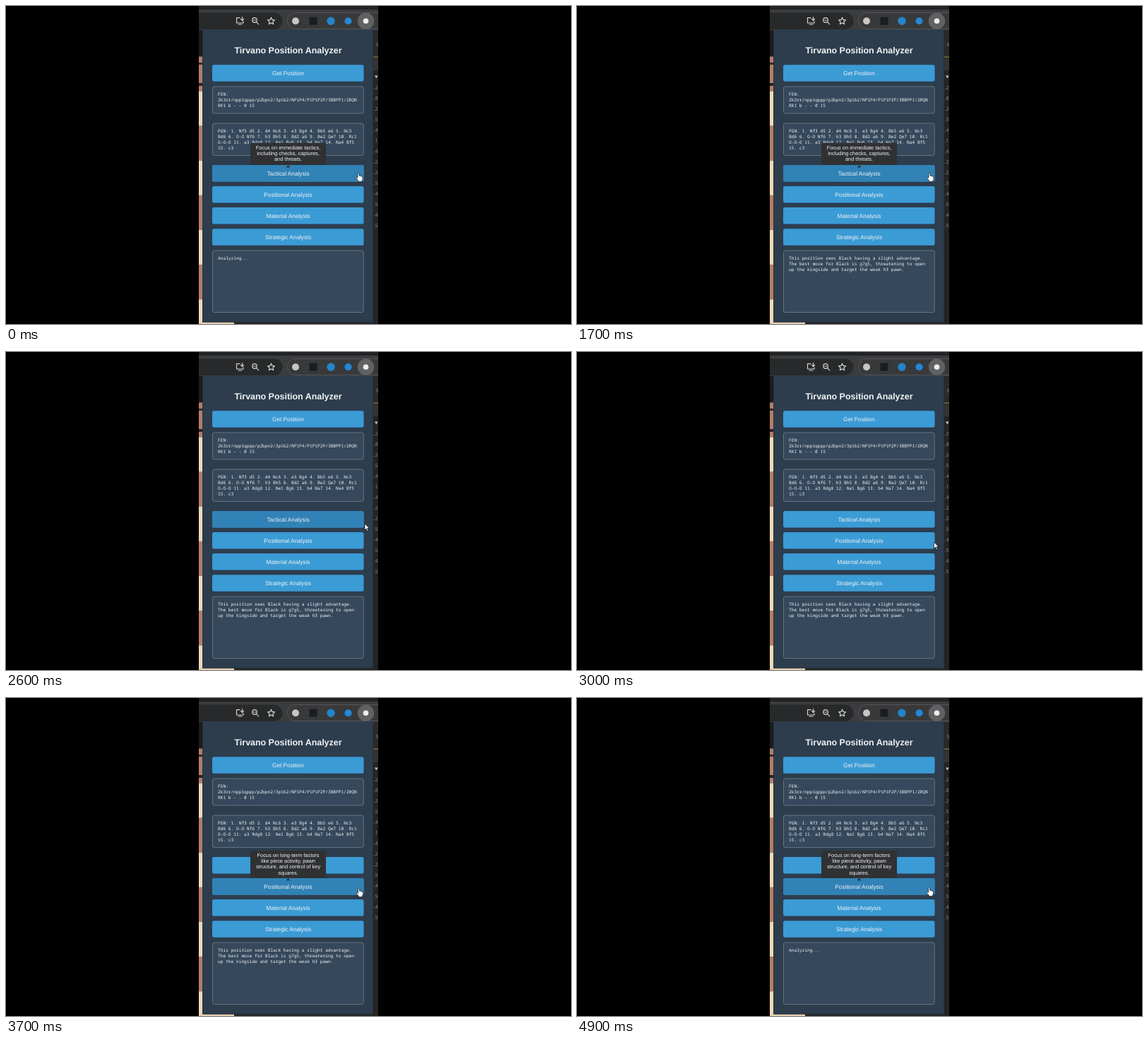
Recreate the animation shown at these times as an HTML page. Size 800 by 450 pixels, loop 5000 ms.

```html
<!DOCTYPE html>
<html lang="en">
<head>
<meta charset="utf-8">
<title>Position Analyzer</title>
<style>
  html, body { margin: 0; width: 100%; height: 100%; overflow: hidden; background: #000; }
  svg { display: block; width: 100vw; height: 100vh; }
  text { fill: #f1f3f5; text-rendering: geometricPrecision; white-space: pre; }
  .ui { font-family: "Liberation Sans", Arial, sans-serif; text-anchor: middle; }
  .title { font-size: 12.45px; font-weight: bold; }
  .label { font-size: 8.25px; }
  .tip { font-size: 7.4px; }
  .mono { font: 6.2px "Noto Sans Mono", "DejaVu Sans Mono", monospace; }
  .side { font: 7px "Noto Sans", sans-serif; fill: #85857f; }
  .icon { fill: none; stroke: #d4d4d4; stroke-width: 1.2; stroke-linecap: round; stroke-linejoin: round; }
  .cursor { fill: #fff; stroke: #111; stroke-width: .7; stroke-linejoin: round; }
</style>
</head>
<body>
<svg id="stage" viewBox="0 0 800 450" preserveAspectRatio="none">
  <defs><clipPath id="phone"><rect x="273" width="254" height="450"/></clipPath></defs>
  <rect width="800" height="450"/>
  <g clip-path="url(#phone)">
    <rect x="273" width="254" height="450" fill="#242424"/>
    <g id="board"></g>
    <g id="side"></g>
    <g id="bar">
      <rect x="273" width="254" height="34" fill="#3b3c3d"/>
      <rect x="273" width="254" height="5" fill="#212223"/>
      <rect x="250" y="9.5" width="141.500" height="23.500" rx="11.700" fill="#28292a"/>
      <rect x="398.500" y="9.500" width="150" height="23" rx="11.500" fill="#38393a" stroke="#5d5e60" stroke-width=".8"/>
      <g class="icon">
        <path d="M331 16.700h-4.500v7.300h9.500v-2.200M329 26h5M334.500 15.500v4.800M332.400 18.400l2.100 2.100 2.100-2.100"/>
        <circle cx="352" cy="20" r="3.300"/>
        <path d="M354.500 22.600l3.200 3.200M350.500 20h3"/>
        <path d="M375.500 16.200l1.450 3.250 3.550.4-2.650 2.350.75 3.500-3.100-1.800-3.100 1.800.75-3.500-2.650-2.350 3.550-.4z"/>
      </g>
      <circle cx="410" cy="21.300" r="5" fill="#c9c5c1"/>
      <rect x="429.500" y="15.700" width="11" height="11" fill="#1b1c1d"/>
      <circle cx="460" cy="21.300" r="5.700" fill="#2583cb"/>
      <circle cx="484.500" cy="21.300" r="5" fill="#2388d8"/>
      <circle cx="509.500" cy="21.300" r="11.700" fill="#606163"/>
      <circle cx="509.500" cy="21.300" r="3.800" fill="#ededed"/>
    </g>
    <rect x="278" y="33.500" width="242" height="414" fill="#2d3d4e"/>
    <path d="M278.500 34v413h241V34" fill="none" stroke="#25303c"/>
    <text class="ui title" x="399.500" y="66.500">Tirvano Position Analyzer</text>
    <g id="panel"></g>
    <g id="tips"></g>
    <path id="arrow" class="cursor" d="M0 0v9l2.100-1.900 1.500 3.400 1.500-.7-1.500-3.200h2.800z"/>
    <path id="hand" class="cursor" d="M-1 1Q-1-.2 0-.2T1 1V4.300Q2.300 3.700 2.800 4.700 4 4.300 4.500 5.200 6 5 6 6.500V8.500Q6 10 5 11V12.400H-.3V11.300L-3.200 7.600Q-3.600 6.600-2.700 6.300-2 6.100-1 7.300Z"/>
  </g>
</svg>
<script>
const LOOP = 5000, STEP = 100;
const $ = id => document.getElementById(id);

function add(parent, tag, attrs, text) {
  const el = document.createElementNS("http://www.w3.org/2000/svg", tag);
  for (const k in attrs) el.setAttribute(k, attrs[k]);
  if (text) el.textContent = text;
  return parent.appendChild(el);
}
const rect = (parent, x, y, width, height, fill, more) =>
  add(parent, "rect", { x, y, width, height, fill, ...more });

function lines(parent, cls, x, y, gap, rows) {
  const g = add(parent, "g", {});
  rows.forEach((row, i) => add(g, "text", { class: cls, x, y: y + i * gap }, row));
  return g;
}

function button(y, label) {
  const p = $("panel");
  rect(p, 292, y, 214.5, 23.5, "#3b9bd5", { rx: 2.5 });
  const dark = rect(p, 292, y, 214.5, 23.5, "#3182b6", { rx: 2.5, opacity: 0 });
  add(p, "text", { class: "ui label", x: 399.5, y: y + 14.8 }, label);
  return dark;
}

function box(y, h, rows) {
  rect($("panel"), 292.5, y, 213.7, h, "#35485c", { rx: 2.5, stroke: "#718089", "stroke-width": .8 });
  return lines($("panel"), "mono", 300, y + 13.1, 7.8, rows);
}

function tooltip(y, h, rows) {
  const g = add($("tips"), "g", {});
  rect(g, 346, y, 107, h, "#303133", { rx: 3 });
  const b = y + h;
  add(g, "path", { d: `M396.500 ${b + 3.5}l3-3.500 3 3.500z`, fill: "#303133" });
  lines(g, "ui tip", 399.5, y + 9.3, 8.2, rows);
  return g;
}

// Edge of the chessboard
rect($("board"), 273, 34, 5, 38, "#1c1c1c");
for (let i = 0; i < 8; i++)
  rect($("board"), 273, 71.5 + i * 49.1, 5, 49.1, i % 2 ? "#efd9b8" : "#b17f68");
rect($("board"), 273, 80, 5, 3, "#3a2d28");
rect($("board"), 273, 109, 5, 4, "#2b2422");
rect($("board"), 273, 447, 50, 3, "#e4cfb0");

// Edge of the evaluation list
rect($("side"), 520, 34, 7, 38, "#2a2a2a");
rect($("side"), 520, 71.5, 7, 1.5, "#77713a");
rect($("side"), 520, 74, 7, 17, "#343434");
add($("side"), "text", { class: "side", x: 523.5, y: 56.5 }, "5");
add($("side"), "path", { d: "M521.800 98.500h5l-2.500 4z", fill: "#bbb" });
[..."28254142254545"].forEach((n, i) =>
  add($("side"), "text", { class: "side", x: 520.5, y: 118 + i * 15 }, "." + n));

button(83.3, "Get Position");
box(114, 38, [
  "FEN:",
  "2k3rr/npp1qppp/p2bpn2/3p1b2/NP1P4/P1P1P2P/3BBPP1/2RQN",
  "RK1 b - - 0 15"
]);
box(166, 45.5, [
  "PGN: 1. Nf3 d5 2. d4 Nc6 3. e3 Bg4 4. Bb5 e6 5. Nc3",
  "Bd6 6. O-O Nf6 7. h3 Bh5 8. Bd2 a6 9. Be2 Qe7 10. Rc1",
  "O-O-O 11. a3 Rdg8 12. Ne1 Bg6 13. b4 Na7 14. Na4 Bf5",
  "15. c3"
]);
const tactical = button(225, "Tactical Analysis");
const positional = button(255, "Positional Analysis");
button(285, "Material Analysis");
button(315.2, "Strategic Analysis");
const waiting = box(346, 87.5, ["Analyzing..."]);
const answer = lines($("panel"), "mono", 300, 359.1, 7.8, [
  "This position sees Black having a slight advantage.",
  "The best move for Black is g7g5, threatening to open",
  "up the kingside and target the weak h3 pawn."
]);
const tip1 = tooltip(193.7, 31.3, [
  "Focus on immediate tactics,", "including checks, captures,", "and threats."
]);
const tip2 = tooltip(215.7, 39, [
  "Focus on long-term factors", "like piece activity, pawn", "structure, and control of key", "squares."
]);

// time, x, y of the pointer tip
const path = [
  [0, 499, 236], [2300, 499, 236], [2500, 501, 237], [2600, 508, 243],
  [2700, 513, 248], [2800, 514, 256], [2900, 511, 264], [3000, 505.5, 269],
  [3100, 500.5, 269], [3200, 499.5, 269], [3700, 499.5, 269], [3900, 498.5, 268],
  [LOOP, 498.5, 268]
];

function pointAt(t) {
  const i = path.findIndex(p => p[0] > t);
  const [t0, x0, y0] = path[i - 1], [t1, x1, y1] = path[i];
  const k = (t - t0) / (t1 - t0);
  return [x0 + (x1 - x0) * k, y0 + (y1 - y0) * k];
}
const ramp = (t, from, to) => Math.min(1, Math.max(0, (t - from) / (to - from)));
const show = (el, on) => el.setAttribute("visibility", on ? "visible" : "hidden");

function draw(t) {
  const away = t >= 2600 && t < 3100;
  const busy = t < 1600 || t >= 4500;
  show(waiting, busy);
  show(answer, !busy);
  show(tip1, t < 2600);
  show(tip2, t >= 3200);
  tactical.setAttribute("opacity", 1 - ramp(t, 2600, 2900));
  positional.setAttribute("opacity", ramp(t, 3000, 3220));
  show($("arrow"), away);
  show($("hand"), !away);
  $(away ? "arrow" : "hand").setAttribute("transform", `translate(${pointAt(t)})`);
}

const start = performance.now();
function tick(now) {
  const t = Math.max(0, now - start) % LOOP;
  draw(Math.floor(t / STEP) * STEP);
  requestAnimationFrame(tick);
}
draw(0);
requestAnimationFrame(tick);
</script>
</body>
</html>
```
